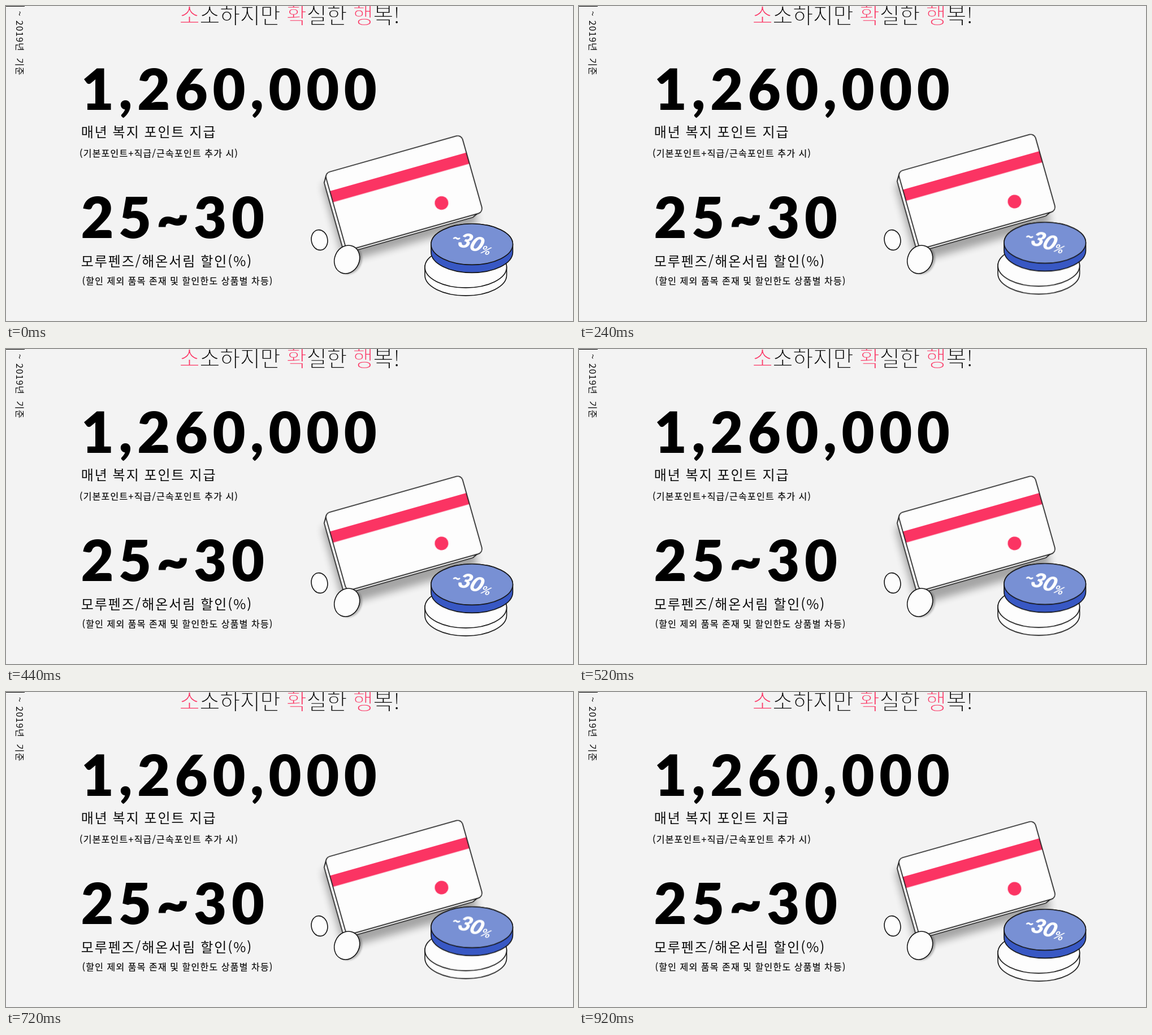
An HTML page for the animation above (960 ms loop, 1003x558 px).

```html
<!DOCTYPE html>
<html lang="ko">
<head>
<meta charset="utf-8">
<title>복지 포인트</title>
<style>
html, body { margin: 0; width: 100%; height: 100%; overflow: hidden; background: #f3f3f3; }
svg { display: block; width: 1003px; height: 558px; }
text { font-family: "Noto Sans CJK KR", "Noto Sans CJK", sans-serif; fill: #0a0a0a; white-space: pre; }
/* the background-coloured stroke thins the regular weight to a hairline */
.title { font-size: 39.5px; font-weight: 100; letter-spacing: -.6px; stroke: #f3f3f3; stroke-width: 1.5; }
.title tspan { fill: #fb3463; }
.big { font: 900 100px Lato, sans-serif; letter-spacing: 8.6px; fill: #000; }
.cap { font-size: 24px; letter-spacing: 1.95px; word-spacing: -.8px; }
.note { font-size: 16px; letter-spacing: 1.25px; word-spacing: -.4px; stroke: #0a0a0a; stroke-width: .2; }
.side { font-size: 16px; letter-spacing: 1px; }
.rate text { font: 900 38px Lato, sans-serif; fill: #fff; }
.line { stroke: #141414; stroke-width: 1.6; stroke-linejoin: round; }
.paper { fill: #fdfdfd; }
.card { animation: card .96s infinite; }
.coins { animation: coins .96s infinite; }
@keyframes card {
  0% { transform: translateY(0); animation-timing-function: steps(12); }
  50% { transform: translateY(-5px); animation-timing-function: steps(12); }
  100% { transform: translateY(0); }
}
@keyframes coins {
  0% { transform: translateY(0); animation-timing-function: steps(16); }
  66.6667% { transform: translateY(-7.2px); animation-timing-function: steps(8); }
  100% { transform: translateY(0); }
}
</style>
</head>
<body>
<svg viewBox="0 0 1003 558">
  <defs>
    <filter id="soft" x="-20%" y="-30%" width="140%" height="160%"><feGaussianBlur stdDeviation="7"/></filter>
    <filter id="near" x="-30%" y="-30%" width="160%" height="160%"><feGaussianBlur stdDeviation="1.6"/></filter>
    <path id="rim" d="M-72.3 0A72.3 36.3 0 0 1 72.3 0V14A72.3 36.3 0 0 1 -72.3 14Z"/>
    <ellipse id="face" rx="72.3" ry="36.3"/>
  </defs>

  <rect width="33" height="1"/>
  <g transform="translate(18 0) rotate(90)">
    <text class="side"><tspan x="9">~</tspan><tspan x="25.5">2019년</tspan><tspan x="92">기준</tspan></text>
  </g>

  <text class="title" x="306.5" y="30.5"><tspan>소</tspan>소하지만 <tspan>확</tspan>실한 <tspan>행</tspan>복!</text>
  <text class="big" x="133" y="183.7">1,260,000</text>
  <text class="cap" x="132.7" y="232">매년 복지 포인트 지급</text>
  <text class="note" x="130" y="267">(기본포인트+직급/근속포인트 추가 시)</text>
  <text class="big" x="132.5" y="410.7">25~30</text>
  <text class="cap" x="132.7" y="461">모루펜즈/해온서림 할인(%)</text>
  <text class="note" x="134.5" y="493">(할인 제외 품목 존재 및 할인한도 상품별 차등)</text>

  <g transform="translate(563.8 296.2) rotate(-15.8)">
    <rect x="-10" y="16" width="247" height="145" rx="10" opacity=".32" filter="url(#soft)"/>
  </g>

  <g class="card">
    <g transform="translate(563.8 296.2) rotate(-15.8)">
      <path class="line paper" d="M1 5L-5.5 16V137Q-5.5 146.5 4 146.5H231L241 142Z"/>
      <rect class="paper" width="251" height="142.6" rx="9"/>
      <path d="M0 33H251V53.5H0Z" fill="#fb3463"/>
      <circle cx="184.5" cy="107" r="12" fill="#fb3463"/>
      <rect class="line" width="251" height="142.6" rx="9" fill="none"/>
    </g>
  </g>

  <ellipse class="line paper" rx="14.3" ry="18" transform="translate(554.5 414.5) rotate(-10)"/>
  <ellipse rx="21.8" ry="25.6" transform="translate(607.5 450.5) rotate(25)" opacity=".25" filter="url(#near)"/>
  <ellipse class="line paper" rx="21.8" ry="25.6" transform="translate(603.2 449) rotate(25)"/>

  <g class="coins">
    <g class="line paper" transform="translate(813.3 462.8)">
      <use href="#rim"/><use href="#face"/>
    </g>
    <g class="line" transform="translate(824.2 422.1)">
      <use href="#rim" fill="#3858c4"/><use href="#face" fill="#7890d4"/>
    </g>
    <g class="rate">
      <text transform="matrix(.93 .27 -.52 .86 787 415.7)" style="font-size:24px">~</text>
      <text transform="matrix(.93 .27 -.52 .86 796 424.5)">30</text>
      <text transform="matrix(.93 .27 -.52 .86 837.5 437)" style="font-size:21px;font-weight:700">%</text>
    </g>
  </g>
</svg>
</body>
</html>
```
